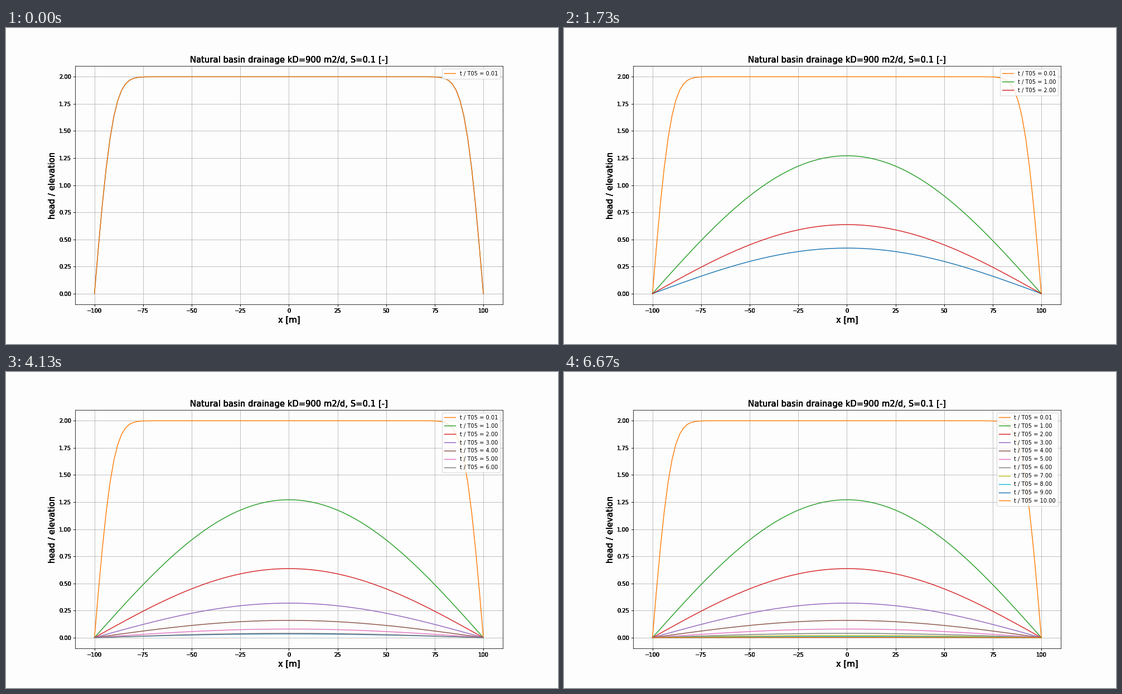
Write a matplotlib script that moves like this. It is 990 by 566 pixels and loops after 6740 ms.

```python
import numpy as np
import matplotlib.pyplot as plt
from matplotlib.animation import FuncAnimation

DPI = 70.75  # an 8 inch high figure fills 566 pixels
STEPS = 100
FRAMES = 2 * (STEPS + 1)
LOOP_MS = 6740
HALF_WIDTH = 100
START_HEAD = 2.0
PAPER = "#fdfdfd"

plt.rcParams["font.family"] = "DejaVu Sans"
plt.rcParams["font.size"] = 10

x = np.linspace(-HALF_WIDTH, HALF_WIDTH, 101)


def head(t):
    """Head in a draining basin, t in units of its half-time."""
    j = np.arange(100)[:, None]
    odd = 2 * j + 1
    terms = (-1.0) ** j / odd * np.cos(odd * np.pi * x / (2 * HALF_WIDTH))
    return START_HEAD * 4 / np.pi * (terms * 0.5 ** (odd**2 * t)).sum(axis=0)


def overprint(artist, times=5):
    """Draw an artist repeatedly so that its soft edges build up."""
    draw = artist.draw

    def draw_all(renderer):
        for _ in range(times):
            draw(renderer)

    artist.draw = draw_all


fig = plt.figure(figsize=(990 / DPI, 566 / DPI), dpi=DPI, facecolor=PAPER)
fig.subplots_adjust(left=0.125, right=0.9, bottom=0.125, top=0.88)
ax = fig.add_subplot(facecolor=PAPER)
ax.set_title("Natural basin drainage kD=900 m2/d, S=0.1 [-]", fontsize=15)
ax.set_xlabel("x [m]", fontsize=15)
ax.set_ylabel("head / elevation", fontsize=15)
ax.set_xlim(-110, 110)
ax.set_ylim(-0.1, 2.1)
ax.set_xticks(np.arange(-100, 101, 25))
ax.set_yticks(np.arange(0, 2.01, 0.25))
ax.yaxis.set_major_formatter("{x:.2f}")
ax.grid(True)

for axis in (ax.xaxis, ax.yaxis):
    overprint(axis.label)
    for tick in axis.get_major_ticks():
        overprint(tick.label1)
        overprint(tick.tick1line)
overprint(ax.title)

moving, = ax.plot(x, head(0.01), color="C0", lw=1.5)
marks = [0.01] + list(range(1, 11))
kept = [
    ax.plot(x, head(t), color=f"C{(i + 1) % 10}", lw=1.5,
            label=f"t / T05 = {t:.2f}")[0]
    for i, t in enumerate(marks)
]


def update(frame):
    # two frames per step, switching midway so each step is settled on its beat
    step = min((frame + 1) // 2, STEPS)
    moving.set_ydata(head(max(step / 10, 0.01)))
    shown = step // 10 + 1
    for i, line in enumerate(kept):
        line.set_visible(i < shown)
    ax.legend(handles=kept[:shown], loc="upper right", facecolor="white")
    return [moving, *kept]


anim = FuncAnimation(fig, update, frames=FRAMES, interval=LOOP_MS / FRAMES,
                     init_func=lambda: update(0), repeat=True,
                     repeat_delay=0, blit=False)
plt.show()
```
